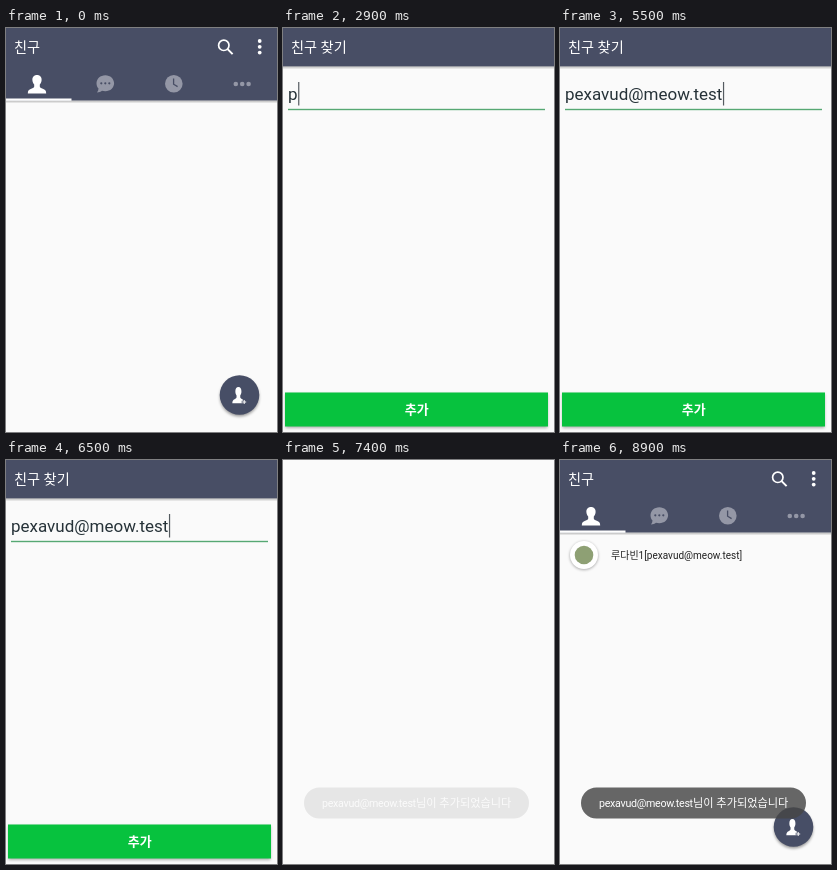
These frames come from a looping animation (271x404 px, 9000 ms). An HTML page:

```html
<!DOCTYPE html>
<html lang="ko">
<head>
<meta charset="utf-8">
<style>
html, body { margin: 0; width: 100%; height: 100%; overflow: hidden; background: #fafafa; }
svg { display: block; width: 100%; height: 100%; }
text { font-family: Roboto, "Noto Sans CJK KR", "Noto Sans CJK", sans-serif; white-space: pre; }
.title { font-size: 14.2px; fill: #fff; }
</style>
</head>
<body>
<svg viewBox="0 0 271 404" lang="ko">
  <defs>
    <linearGradient id="shade" x2="0" y2="1">
      <stop offset="0" stop-color="#000" stop-opacity=".28"/>
      <stop offset="1" stop-color="#000" stop-opacity="0"/>
    </linearGradient>
    <filter id="soft" x="-30%" y="-30%" width="160%" height="160%"><feGaussianBlur stdDeviation="1.8"/></filter>
    <path id="person" d="M0-9.2c3 0 4.8 2.2 4.6 5.2-.1 2-1 3.2-1.8 4.3v1.9c0 1 1.2 1.6 3 2.3 2.2.8 3.4 1.8 3.4 4.7h-18.4c0-2.9 1.2-3.9 3.4-4.7 1.8-.7 3-1.3 3-2.3v-1.9c-.8-1.1-1.7-2.3-1.8-4.3-.2-3 1.6-5.2 4.6-5.2z"/>
  </defs>
  <rect id="back" width="271" height="404"/>

  <g id="main">
    <rect width="271" height="404" fill="#fafafa"/>
    <rect y="72.5" width="271" height="3" fill="url(#shade)"/>
    <rect width="271" height="72.5" fill="#484e65"/>
    <text class="title" x="8" y="24">친구</text>
    <g fill="none" stroke="#fff" stroke-width="1.7">
      <circle cx="217.8" cy="17.3" r="5.2"/>
      <path d="M221.6 21.1l5 5" stroke-width="2"/>
    </g>
    <g fill="#fff">
      <circle cx="253.7" cy="13" r="1.9"/><circle cx="253.7" cy="18.8" r="1.9"/><circle cx="253.7" cy="24.6" r="1.9"/>
      <use href="#person" x="31" y="56.2"/>
      <rect y="70.5" width="65.5" height="2.3"/>
    </g>
    <g fill="#9497a6">
      <path d="M99.3 47.3c5 0 8.8 3.6 8.8 8s-3.8 8-8.8 8c-1.200 0-2.300-.2-3.300-.5-1.300 1-2.900 1.500-5 1.600 1-1.200 1.500-2.500 1.500-3.800-1.300-1.400-2-3.200-2-5.300 0-4.400 3.800-8 8.800-8z"/>
      <circle cx="167.8" cy="55.8" r="8.8"/>
      <circle cx="229.8" cy="56" r="2.3"/><circle cx="236.2" cy="56" r="2.3"/><circle cx="242.600" cy="56" r="2.3"/>
    </g>
    <g fill="#484e65">
      <circle cx="95.300" cy="55.300" r="1.100"/><circle cx="99.300" cy="55.300" r="1.100"/><circle cx="103.300" cy="55.300" r="1.100"/>
    </g>
    <path d="M167.600 50.500v5.700l4 2.400" fill="none" stroke="#484e65" stroke-width="1.300"/>
    <g id="row">
      <circle cx="24" cy="95.800" r="14" opacity=".35" filter="url(#soft)"/>
      <circle cx="24" cy="95" r="14" fill="#fff"/>
      <circle cx="24" cy="95" r="9.300" fill="#8ea074"/>
      <text id="entry" x="51" y="98.700" font-size="10" fill="#222"/>
    </g>
    <circle cx="233.500" cy="369" r="19.500" opacity=".4" filter="url(#soft)"/>
    <circle cx="233.500" cy="367" r="19.800" fill="#474e66"/>
    <use href="#person" fill="#fff" transform="translate(232.400 367.200) scale(.66 .88)"/>
    <path d="M238.200 371.500v5M235.700 374h5" stroke="#474e66" stroke-width="2.600"/>
    <path d="M238.200 372v4M236.200 374h4" stroke="#fff"/>
  </g>
  <rect id="dim" width="271" height="404" opacity=".16"/>

  <g id="find">
    <rect y="-20" width="271" height="424" fill="#fafafa"/>
    <rect y="38" width="271" height="3.500" fill="url(#shade)"/>
    <rect width="271" height="38.300" fill="#484e65"/>
    <rect y="-20" width="271" height="20" fill="#3f4457"/>
    <text class="title" x="8" y="24">친구 찾기</text>
    <text id="hint" x="5" y="72" font-size="17" fill="#35a95c">이메일 검색</text>
    <text id="typed" x="5" y="72" font-size="17" fill="#263238"/>
    <rect id="caret" y="54" width="1.200" height="23.500" fill="#555b60"/>
    <rect x="5" y="80.800" width="257" height="1.400" fill="#56a873"/>
    <rect x="2.500" y="366" width="262" height="34" opacity=".3" filter="url(#soft)"/>
    <rect x="2" y="364.500" width="263" height="34" fill="#07c23e"/>
    <text x="133.700" y="386.300" font-size="13" font-weight="700" fill="#fff" text-anchor="middle">추가</text>
  </g>

  <g id="toast">
    <rect x="21" y="327.500" width="225" height="31" rx="15.500" fill="#464646" opacity=".9"/>
    <g fill="#fff">
      <text id="who" x="39" y="347" font-size="10.700" letter-spacing="-.3"/>
      <text x="133" y="347" font-size="11.200">님이 추가되었습니다</text>
    </g>
  </g>
</svg>
<script>
const LOOP = 9000, MAIL = 'pexavud@meow.test';
const el = id => document.getElementById(id);
const [back, main, row, dim, find, hint, typed, caret, toast] =
  ['back', 'main', 'row', 'dim', 'find', 'hint', 'typed', 'caret', 'toast'].map(el);
el('entry').textContent = `루다빈1[${MAIL}]`;
el('who').textContent = MAIL;

// moments at which each further key lands; two keys fall together once
const keys = [2900, 3500, 3600, 3600, 3700, 3800, 4000, 4200, 4500,
  4700, 4800, 4900, 5000, 5200, 5300, 5400, 5500];

// value of the last [time, value] step already reached
const at = (steps, t) => steps.reduce((v, [s, x]) => t >= s ? x : v, 0);
const mainFade = [[0, 1], [1800, 0], [7700, .6], [7800, 1]];
const findFade = [[1700, .94], [1800, 1], [7000, .96], [7100, .65], [7200, 0]];
const findDrop = [[1700, 5], [1800, 0], [7000, 1], [7100, 5]];
const toastFade = [[7400, .12], [7500, .4], [7600, .69], [7700, .9], [7800, 1], [8800, .96], [8900, .91]];
const caretOn = [[1700, 1], [2100, 0], [2600, 1], [6000, 0], [6500, 1]];

function fade(node, v) {
  node.setAttribute('opacity', v);
  node.style.display = v ? '' : 'none';
}

function draw(t) {
  t = Math.floor(t / 100) * 100;
  const count = keys.filter(k => t >= k).length;
  typed.textContent = MAIL.slice(0, count);
  hint.style.display = count ? 'none' : '';
  caret.setAttribute('x', 5 + (count ? typed.getComputedTextLength() + .6 : 0));
  fade(caret, at(caretOn, t));
  back.setAttribute('fill', t >= 7000 && t < 7200 ? '#dedede' : '#fafafa');
  fade(main, at(mainFade, t));
  row.style.display = t >= 7900 ? '' : 'none';
  dim.style.display = t >= 1700 && t < 1800 ? '' : 'none';
  fade(find, at(findFade, t));
  find.setAttribute('transform', `translate(0 ${at(findDrop, t)})`);
  fade(toast, at(toastFade, t));
}

const start = performance.now();
function tick() {
  draw((performance.now() - start) % LOOP);
  requestAnimationFrame(tick);
}
tick();
</script>
</body>
</html>
```
